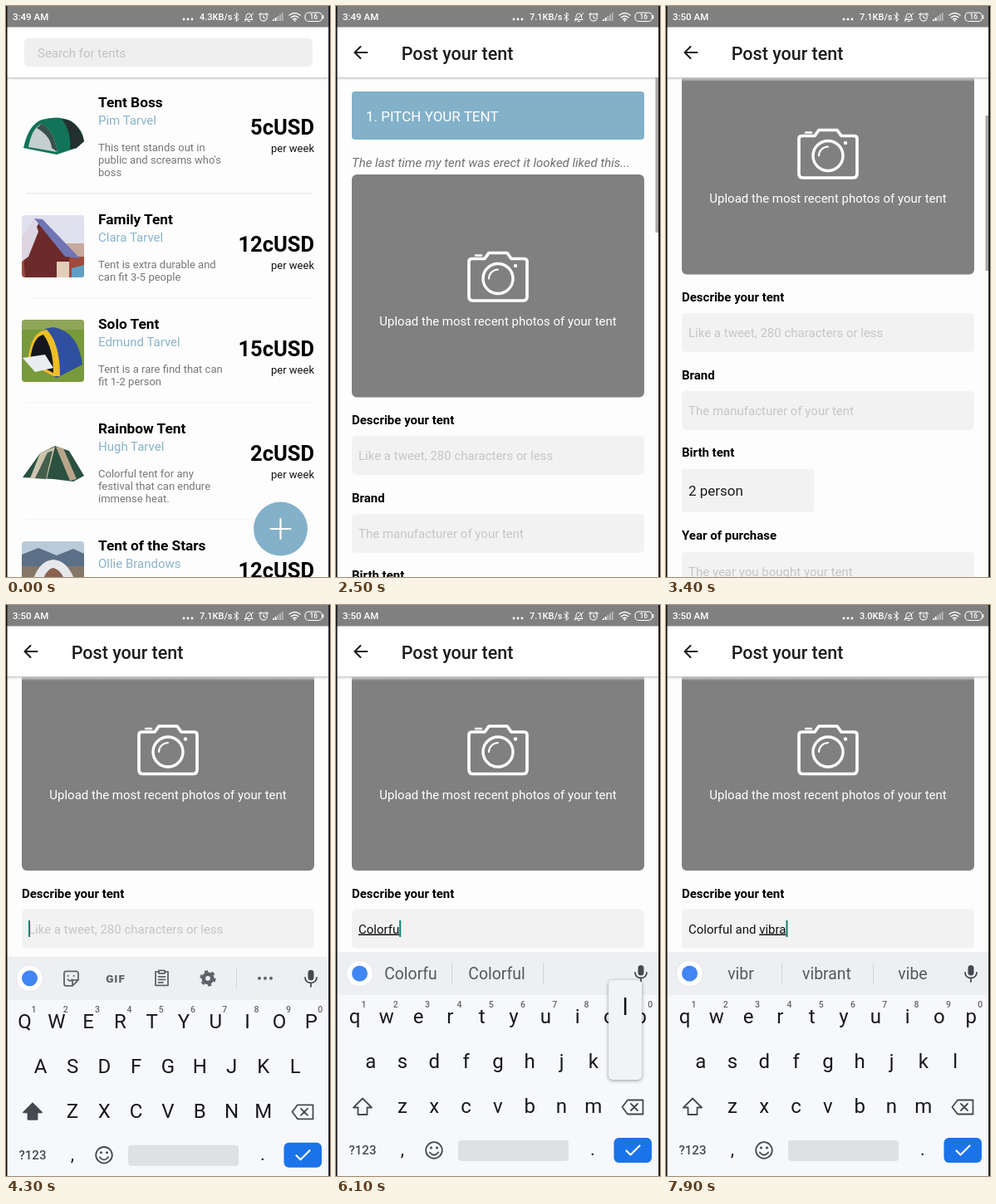
An HTML page that plays this animation: 390x688 px, repeating every 8 s.

```html
<!DOCTYPE html>
<html lang="en">
<head>
<meta charset="utf-8">
<title>Tent rental app</title>
<style>
  html, body { margin: 0; width: 100%; height: 100%; overflow: hidden; background: #fdfdfd; }
  svg { display: block; font-family: Roboto, sans-serif; }
  text { white-space: pre; }
  .line { fill: none; stroke-linecap: round; stroke-linejoin: round; }
  #popup rect { filter: drop-shadow(0 1px 2px #0006); }
</style>
</head>
<body>
<svg id="stage" width="390" height="688" viewBox="0 0 390 688"></svg>
<script>
const LOOP = 8000, TICK = 100, BLUE = '#82b1c9', INK = '#45494d', GRAY = '#5f6368';
const $ = id => document.getElementById(id);
const ramp = (t, a, b) => Math.min(1, Math.max(0, (t - a) / (b - a)));
const show = (id, on) => $(id).setAttribute('visibility', on ? 'visible' : 'hidden');
const move = (id, x, y) => $(id).setAttribute('transform', `translate(${x} ${y})`);

const text = (x, y, size, fill, s, attrs = '') =>
  `<text x="${x}" y="${y}" font-size="${size}" fill="${fill}" ${attrs}>${s}</text>`;
const rect = (x, y, w, h, fill, r = 0, attrs = '') =>
  `<rect x="${x}" y="${y}" width="${w}" height="${h}" rx="${r}" fill="${fill}" ${attrs}/>`;
const disc = (x, y, r, fill, attrs = '') => `<circle cx="${x}" cy="${y}" r="${r}" fill="${fill}" ${attrs}/>`;
const ring = (x, y, r, color, width, attrs = '') =>
  disc(x, y, r, 'none', `stroke="${color}" stroke-width="${width}" ${attrs}`);
const shape = (d, fill) => `<path d="${d}" fill="${fill}"/>`;
const line = (d, color, width, attrs = '') =>
  `<path class="line" d="${d}" stroke="${color}" stroke-width="${width}" ${attrs}/>`;
const BOLD = ' font-weight="700" ', MEDIUM = ' font-weight="500" ';
const MIDDLE = ' text-anchor="middle" ', END = ' text-anchor="end" ';

// Tent pictures, each 75 by 75
const pictures = [
  shape('M2 60Q8 32 24 26Q44 20 60 28Q74 38 75 52L66 60L42 68Z', '#117358') +
  shape('M48 25Q68 26 75 52L66 60L58 62Q60 40 48 25Z', '#23302f') +
  shape('M8 59Q12 36 24 31Q38 38 43 65Z', '#c6cfcf') +
  shape('M24 31Q38 38 43 65L36 60Q35 46 18 36Z', '#38514b'),

  rect(0, 0, 75, 75, '#dfe1ee') + rect(44, 34, 31, 20, '#c9a99c') + rect(0, 50, 75, 25, '#a04a3c') +
  shape('M20 10L58 50L54 75H4L2 48Z', '#6d2a2a') +
  shape('M15 4L20 20L8 50L0 56V26Z', '#ddd5e3') + shape('M15 4L25 5L70 52L52 50Z', '#7075b4') +
  rect(42, 56, 15, 19, '#e3cdb8') + shape('M60 64L75 60V75H60Z', '#5f9fc4'),

  rect(0, 0, 75, 75, '#789a3b') + rect(0, 0, 75, 12, '#8fa55a') +
  shape('M7 52Q10 12 38 9Q68 14 73 54L42 70Z', '#304f9f') +
  shape('M7 52Q10 14 30 12Q46 28 46 68L38 68Z', '#efbe25') +
  shape('M10 50Q13 20 26 18Q38 34 38 64Z', '#15171d') +
  shape('M1 46L28 42L38 58L16 63Z', '#e9edf0'),

  shape('M1 64L22 35L40 26L57 32L75 62L62 69L38 66Z', '#2b5141') +
  shape('M22 35L40 27L30 66L10 65Z', '#cfc5ae') + shape('M31 34L37 32L29 66L16 65Z', '#44604d') +
  shape('M41 27L50 29L66 66L58 68Z', '#b9a58b'),

  rect(0, 0, 75, 75, '#b9cbd8') + shape('M0 16L20 8L42 17L62 9L75 15V75H0Z', '#5b7086') +
  shape('M0 30H75V75H0Z', '#857767') + shape('M10 62Q16 24 38 22Q60 24 68 62Z', '#e6e9ec') +
  shape('M22 62Q26 34 38 32Q52 36 55 62Z', '#8a6252'),
];
const tents = [
  ['Tent Boss', 'Pim Tarvel', '5cUSD', 'This tent stands out in', 'public and screams who\'s', 'boss'],
  ['Family Tent', 'Clara Tarvel', '12cUSD', 'Tent is extra durable and', 'can fit 3-5 people'],
  ['Solo Tent', 'Edmund Tarvel', '15cUSD', 'Tent is a rare find that can', 'fit 1-2 person'],
  ['Rainbow Tent', 'Hugh Tarvel', '2cUSD', 'Colorful tent for any', 'festival that can endure', 'immense heat.'],
  ['Tent of the Stars', 'Ollie Brandows', '12cUSD'],
];

let nextRow = 116;
const tentRow = ([title, owner, price, ...about], i) => {
  const y = nextRow, height = 96 + 15 * about.length;
  nextRow += height;
  return `<g transform="translate(0 ${y})">
    <g transform="translate(19 -5)" clip-path="url(#photo)">${pictures[i]}</g>
    ${text(111, 5.6, 17.3, '#000', title, BOLD)}${text(111, 27, 15, '#8ab3ca', owner)}
    ${about.map((s, n) => text(111, 58.6 + 15 * n, 13, '#777', s)).join('')}
    ${text(371, 38.7, 25.5, '#000', price, BOLD + END)}${text(371, 59.7, 13, '#111', 'per week', END)}
    ${rect(24, height - 32, 345, 1.5, i ? '#f7f7f7' : '#ececec')}</g>`;
};
const header = inner => rect(0, 86, 390, 5, 'url(#shade)') + rect(0, 25, 390, 61, '#fff') + inner;

const listScreen = tents.map(tentRow).join('') +
  header(rect(22, 39, 347, 34, '#efefef', 5) + text(38, 62, 15, '#c3c3c3', 'Search for tents')) +
  `<g id="fab">${disc(330.5, 630, 32.5, BLUE)}${line('M318.5 630h24m-12-12v24', '#fff', 2.2, 'id="plus"')}</g>`;

const label = (y, s) => text(19, y, 15, '#000', s, BOLD);
const field = (y, hint, attrs = '') =>
  rect(19, y, 352, 47, '#f2f2f2', 5) + text(27, y + 29, 15, '#c6c6c6', hint, attrs);
const camera = line('M164 304.5H179L184 297.5H206L211 304.5H226Q230 304.5 230 308V350Q230 355 225 355H165' +
    'Q160 355 160 350V308Q160 304.5 164 304.5Z', '#fff', 3.7) +
  ring(195, 328.5, 18, '#fff', 3.4) + line('M184 328.5A11 11 0 0 1 195 317.5', '#fff', 2.1) +
  line('M168 300.5h7', '#fff', 2.4) + disc(216, 313, 2.2, '#fff');

const postScreen = rect(0, 25, 390, 720, '#fdfdfd') + `<g id="form">
  ${rect(19, 103, 352, 58, BLUE, 4)}${text(36, 139, 17, '#fff', '1. PITCH YOUR TENT')}
  ${text(19, 194, 15, '#707070', 'The last time my tent was erect it looked liked this...', 'font-style="italic"')}
  ${rect(19, 203, 352, 268.5, '#808080', 6)}${camera}
  ${text(195, 385, 15, '#fff', 'Upload the most recent photos of your tent', MIDDLE)}
  ${label(504, 'Describe your tent')}${field(518, 'Like a tweet, 280 characters or less', 'id="hint"')}
  ${text(27, 547, 15, '#111', '', 'id="typed"')}${rect(27, 531.5, 2, 20, '#12806f', 0, 'id="cursor"')}
  ${label(598, 'Brand')}${field(612, 'The manufacturer of your tent')}
  ${label(691, 'Birth tent')}${rect(19, 706, 159, 52, '#f2f2f2', 4)}${text(27, 738, 17, '#1c1c1c', '2 person')}
  ${label(791, 'Year of purchase')}${field(806, 'The year you bought your tent')}
  </g>` + header(line('M37.5 56H22.5M29.5 49L22.5 56L29.5 63', '#1c1c1e', 2.1) +
    text(78.7, 65, 21.5, '#1c1c1e', 'Post your tent', MEDIUM)) +
  rect(384.5, 86, 4, 187, '#a9a9a9', 0, 'id="scrollbar"');

// Keyboard
const keys = {};
['qwertyuiop', 'asdfghjkl', 'zxcvbnm'].forEach((row, r) =>
  [...row].forEach((c, i) => keys[c] = { x: [22.5, 41.7, 80][r] + 38.3 * i, y: 504 + 54 * r }));
const numbers = [...'1234567890'].map((n, i) => text(33.5 + 38.3 * i, 485, 10.5, '#666', n, MIDDLE + MEDIUM));
const divider = x => rect(x, 431, 1, 26, '#d3d6da');
const icon = d => line(d, GRAY, 1.8);

const keyboard = rect(0, 418, 390, 400, '#f7f8fc') + rect(0, 418, 390, 52, '#edeff2') +
  disc(28.5, 444, 16, '#fff', 'stroke="#e4e6e9"') + disc(28.5, 444, 9.5, '#4285f4') +
  `<g id="tools">
    ${icon('M72 435.5H84Q87 435.5 87 438.5V446L80 453H72Q70 453 70 450V438Q70 435.5 72 435.5Z' +
      'M87 446H80V453M74.5 441h.5m6.5 0h.5M74.5 445.5q3 3 5 0')}
    ${text(132, 449, 13.5, GRAY, 'GIF', MIDDLE + 'font-weight="900" letter-spacing="1"')}
    ${icon('M184 436H180V452.5H195V436H191M184 434.5H191V438H184ZM183.5 442H191.5M183.5 445.5H191.5M183.5 449H189')}
    ${ring(243, 444, 5.2, GRAY, 4.6)}${ring(243, 444, 8.3, GRAY, 2.6, 'stroke-dasharray="4.2 4.49"')}
    ${divider(277)}${[305, 312, 319].map(x => disc(x, 444, 2, GRAY)).join('')}
  </g><g id="words">${divider(139)}${divider(249)}
    ${[90, 193.5, 297].map(x => text(x, 451, 19.4, '#55595e', '', MIDDLE + 'class="word"')).join('')}</g>` +
  rect(363.5, 434, 7, 12.5, INK, 3.5) + line('M360 443Q360.5 449.5 367 449.5T374 443M367 450V454', INK, 1.8) +
  numbers.join('') +
  Object.entries(keys).map(([c, k]) => text(k.x, k.y, 24, '#17181a', c, MIDDLE + 'class="key"')).join('') +
  line('M32 594.5L43 605.5H37.5V614H26.5V605.5H21Z', INK, 1.8, 'id="shift"') +
  line('M351 596.5H369.5V613.5H351L344.5 605ZM355 601l8 8m0-8l-8 8', INK, 1.8) +
  text(32, 662, 15, INK, '?123', MIDDLE + MEDIUM) + text(80, 663, 22, '#222', ',', MIDDLE) +
  ring(118, 657, 9.8, INK, 1.8) + disc(114.5, 654, 1.5, INK) + disc(121.5, 654, 1.5, INK) +
  line('M112.8 659.5Q118 666 123.2 659.5', INK, 1.8) +
  rect(147, 645, 133, 25, '#dfe0e3', 4, 'id="space"') + text(309, 663, 22, '#222', '.', MIDDLE) +
  rect(334.5, 642, 45.5, 30, '#1a73e8', 6) + line('M349.5 657.5L354.5 662.5L365.5 651.5', '#fff', 2.2) +
  `<g id="popup">${rect(-20, -106, 40, 120, '#f2f3f7', 5)}${text(0, -64, 28, '#111', '', MIDDLE + 'id="pressed"')}</g>`;

const statusIcons = [214, 219, 224].map(x => disc(x, 16, 1.4, '#fff')).join('') +
  line('M274.5 10.5L280 15.8L277.3 18.5V8L280 10.5L274.5 15.8', '#fff', 1) +
  line('M287.5 16.5H297L295.5 14.5V12Q295 9 292.3 9T289 12V14.5ZM291 18.5h2.5M287 18.5L298 8.5', '#fff', 1) +
  ring(310, 13.8, 4.3, '#fff', 1.1) +
  line('M310 11.5V14L312 15M304.5 10.5L307 8.5M313 8.5L315.5 10.5', '#fff', 1.1) +
  [0, 1, 2, 3, 4].map(i => rect(321 + 2.7 * i, 16 - 2 * i, 1.9, 2 + 2 * i, i < 2 ? '#fff' : '#ffffff70')).join('') +
  line('M341 11Q347.5 6 354 11M343.2 13.7Q347.5 10.3 351.8 13.7M345.4 16Q347.5 14.5 349.6 16', '#fff', 1.4) +
  disc(347.5, 17.7, 1.1, '#fff') +
  rect(360, 8, 20.5, 10.5, 'none', 4.5, 'stroke="#fff" stroke-width="1.1"') + rect(381.3, 11, 1.2, 4.5, '#fff') +
  text(370.3, 16.4, 8.5, '#fff', '16', MIDDLE + MEDIUM);

$('stage').innerHTML = `<defs>
    <clipPath id="photo">${rect(0, 0, 75, 75, '#000', 4)}</clipPath>
    <linearGradient id="shade" x2="0" y2="1">
      <stop stop-color="#c4c4c4"/><stop offset="1" stop-color="#fff" stop-opacity="0"/>
    </linearGradient>
  </defs>${rect(0, 0, 390, 688, '#fdfdfd')}
  <g>${listScreen}</g><g id="post">${postScreen}</g><g id="keyboard">${keyboard}</g>
  ${rect(0, 0, 390, 25.5, '#808080')}
  ${text(8, 17, 11.5, '#fff', '', MEDIUM + 'id="clock"')}${text(233, 17, 11, '#fff', '', MEDIUM + 'id="speed"')}
  ${statusIcons}${rect(0, 0, 1.5, 688, '#111')}${rect(388.2, 0, 1.8, 688, '#111')}`;

// Typing: a letter is committed one tick after its key goes down
const phrase = 'Colorful and vibra';
const presses = [4900, 5100, 5200, 5300, 5400, 5800, 5900, 6100, 6400,
  6500, 6700, 6800, 7000, 7300, 7400, 7500, 7700, 7800];
const typedAt = t => phrase.slice(0, presses.filter(p => p + TICK <= t).length);
const guesses = {
  C: 'Can Could', Co: 'Could Come', Col: 'Cold Color', Colo: 'Color Colors', Color: 'Colors Colorful',
  Colorf: 'Colorful', Colorfu: 'Colorful', Colorful: 'Colorfully', a: 'and are', an: 'and any', and: 'any ands',
  v: 'very view', vi: 'view video', vib: 'vibe vibes', vibr: 'vibrant vibe',
};
const suggest = typed => {
  const word = typed.split(' ').pop();
  if (word) return [word, ...guesses[word].split(' ')];
  return typed.includes('and') ? ['the', 'I', 'a'] : ['and', 'tent', 'one'];
};
const keyNodes = document.querySelectorAll('.key'), wordNodes = document.querySelectorAll('.word');

function drawTyping(t) {
  const typed = typedAt(t), earlier = typedAt(t - TICK), upper = !typed;
  const [word] = typed.match(/\S*$/);
  $('typed').innerHTML = typed.slice(0, typed.length - word.length) +
    `<tspan text-decoration="underline">${word}</tspan>`;
  $('cursor').setAttribute('x', 27 + $('typed').getComputedTextLength());
  show('cursor', t >= 4000 && (typed || (t - 4200) % 1000 < 500));
  show('hint', !typed);
  show('tools', !earlier);
  show('words', earlier);
  const words = earlier ? suggest(earlier) : [];
  wordNodes.forEach((node, i) => node.textContent = words[i] || '');
  keyNodes.forEach(node => {
    const letter = node.textContent;
    node.textContent = upper ? letter.toUpperCase() : letter.toLowerCase();
  });
  $('shift').style.fill = upper ? INK : 'none';

  const down = phrase[presses.findIndex(p => t >= p && t < p + TICK)];
  const key = down && keys[down.toLowerCase()];
  show('popup', key);
  if (key) move('popup', key.x, key.y);
  $('pressed').textContent = down || '';
  $('space').setAttribute('fill', down === ' ' ? '#c6c8cc' : '#dfe0e3');
}

function draw(t) {
  $('clock').textContent = t < 2900 ? '3:49 AM' : '3:50 AM';
  $('speed').textContent = (t < 1900 ? '4.3' : t < 6200 ? '7.1' : '3.0') + 'KB/s';
  const release = t < 1700 ? 1 : ramp(t, 1700, 2000);
  $('fab').setAttribute('opacity', .2 + .8 * release);
  $('plus').setAttribute('opacity', release);

  const enter = ramp(t, 2100, 2400);
  $('post').setAttribute('opacity', enter);
  move('post', 0, 55 * (1 - enter) ** 2);

  const drag = ramp(t, 3000, 3400);
  const scroll = 148 * drag * drag * (3 - 2 * drag) + 3.5 * ramp(t, 4000, 4300);
  move('form', 0, -scroll);
  $('scrollbar').setAttribute('y', 86 + scroll * .311);
  $('scrollbar').setAttribute('opacity', t < 3000 ? 1 - ramp(t, 2600, 2900) : 1 - ramp(t, 3500, 3800));

  move('keyboard', 0, 370 * (1 - ramp(t, 4000, 4400)) ** 3);
  drawTyping(t);
}

function tick() {
  draw(Math.floor(performance.now() % LOOP / TICK) * TICK);
  requestAnimationFrame(tick);
}
tick();
</script>
</body>
</html>
```
